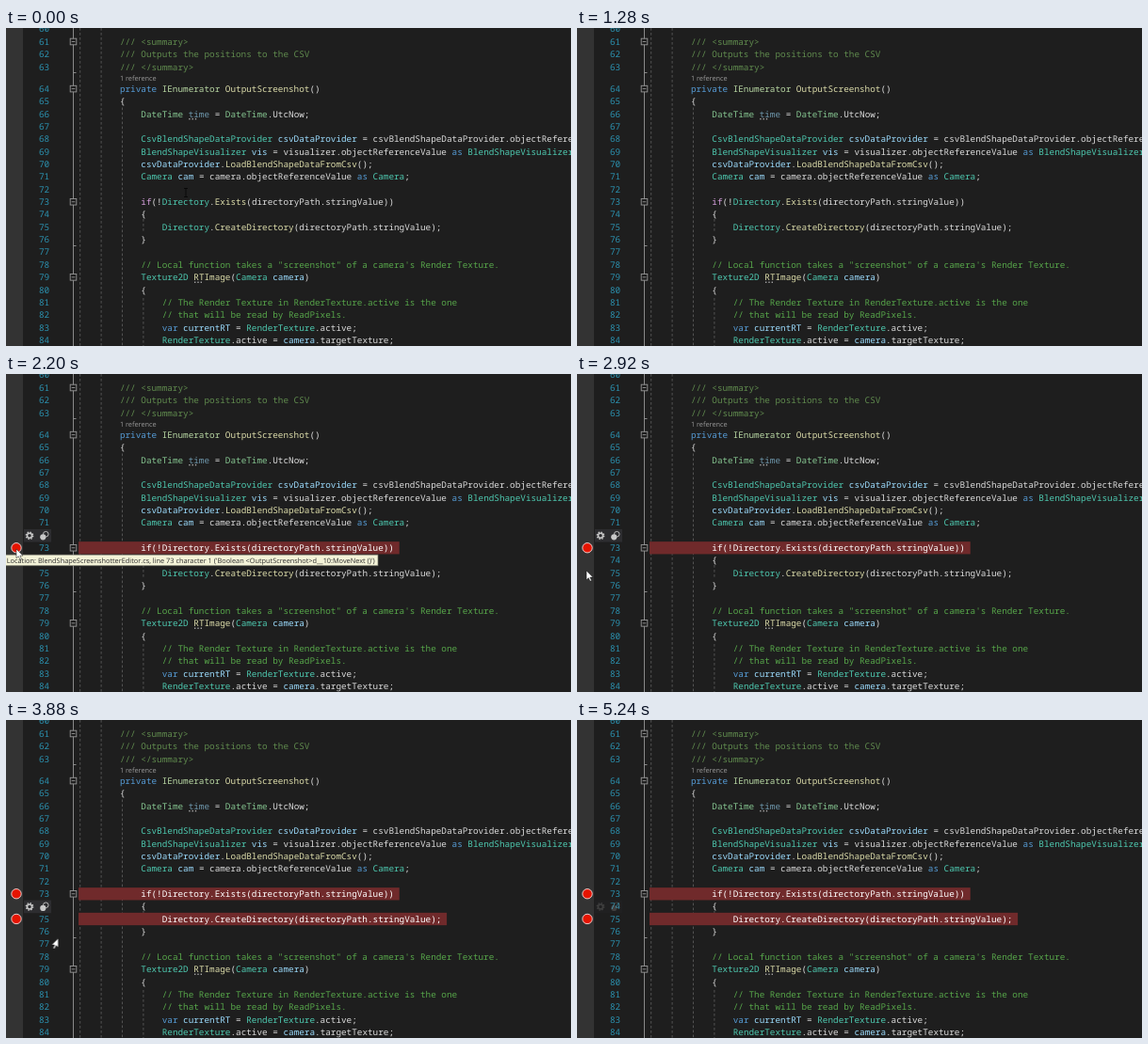
Recreate the animation shown at these times as an HTML page. Size 600 px wide and 338 px high, loop 5280 ms.

```html
<!DOCTYPE html>
<html lang="en">
<head>
<meta charset="utf-8">
<title>Setting breakpoints</title>
<style>
html, body { margin: 0; width: 100%; height: 100%; overflow: hidden; background: #1e1e1e; }
svg { display: block; width: 100%; height: 100%; }
text { white-space: pre; text-rendering: geometricPrecision; }
#numbers, #code, .hit { font: 9.333px "Noto Sans Mono", monospace; }
#numbers { fill: #2b91af; }
.ui { font: 7.35px "Open Sans", sans-serif; }

/* token colours */
.p { fill: #dcdcdc; } .k { fill: #569cd6; } .f { fill: #d8a0df; }
.t { fill: #4ec9b0; } .s { fill: #86c691; } .i { fill: #b8d7a3; }
.m { fill: #dcdcaa; } .v { fill: #9cdcfe; } .u { fill: #6f98ad; }
.c { fill: #57a64a; } .d { fill: #608b4e; }
.hit text { fill: #fff; }

.anim { animation: 5280ms step-end infinite; }
#hit73 { animation-name: hit73; }
#hit75 { animation-name: hit75; }
#bar73 { animation-name: bar73; }
#bar75 { animation-name: bar75; animation-timing-function: linear; }
#tip73 { animation-name: tip73; }
#tip75 { animation-name: tip75; }
#beam { animation-name: beam; }
#arrow { animation-name: arrowShow, arrowMove; }
#mirror { animation-name: mirrorShow, mirrorMove; }
#arrow, #mirror { animation-timing-function: step-end, ease-in-out; }

@keyframes hit73 { 0% { opacity: 0; } 36.364%, 100% { opacity: 1; } }
@keyframes hit75 { 0% { opacity: 0; } 65.152%, 100% { opacity: 1; } }
@keyframes bar73 { 0% { opacity: 0; } 38.636% { opacity: 1; } 65.152%, 100% { opacity: 0; } }
@keyframes bar75 { 0%, 65.9% { opacity: 0; } 66.667%, 96.212% { opacity: 1; } 100% { opacity: 0; } }
@keyframes tip73 { 0% { opacity: 0; } 40.152% { opacity: 1; } 46.97%, 100% { opacity: 0; } }
@keyframes tip75 { 0% { opacity: 0; } 68.182% { opacity: 1; } 71.212%, 100% { opacity: 0; } }
@keyframes beam { 0% { opacity: 1; } 10.606%, 100% { opacity: 0; } }
@keyframes arrowShow { 0% { opacity: 0; } 30.303% { opacity: 1; } 71.97%, 100% { opacity: 0; } }
@keyframes arrowMove {
  0%, 30.303% { transform: translate(32px, 182px); }
  31.818%, 45.455% { transform: translate(11px, 186px); }
  51.515%, 70.076% { transform: translate(10px, 209px); }
  71.97%, 100% { transform: translate(40px, 226px); }
}
@keyframes mirrorShow { 0% { opacity: 0; } 71.97% { opacity: 1; } 75.758%, 100% { opacity: 0; } }
@keyframes mirrorMove {
  0%, 71.97% { transform: translate(46px, 228px); }
  73.485%, 100% { transform: translate(55.5px, 232px); }
}
</style>
</head>
<body>
<svg viewBox="0 0 600 338">
  <defs>
    <path id="pointer" d="M0 0V9.8L2.3 7.7L3.9 11.3L5.5 10.6L3.9 7.1H7Z" fill="#fff" stroke="#111" stroke-width=".5"/>
    <g id="bar">
      <rect x="19" y="-6.8" width="29" height="13.6" fill="#2d2d30"/>
      <g fill="none" stroke="#c8c8c8">
        <circle cx="25" r="2.5" stroke-width="1.5"/>
        <circle cx="25" r="3.7" stroke-width="1.4" stroke-dasharray="1.45 1.456"/>
        <circle cx="42.3" cy="-1.6" r="2.8" stroke-width=".9"/>
      </g>
      <circle cx="39.3" cy="1.5" r="3.1" fill="#c8c8c8"/>
    </g>
  </defs>

  <rect width="600" height="338" fill="#1e1e1e"/>
  <rect width="18" height="338" fill="#333"/>
  <g id="guides" fill="none" stroke="#5a5a5a" stroke-width=".9" stroke-dasharray="2.7 2.3">
    <path d="M78.7 0V338M101.1 0V338M123.5 84.5V338M145.9 198V218M145.9 287V338"/>
  </g>
  <g id="outline" fill="#1e1e1e" stroke="#969696" stroke-width=".9">
    <path d="M71.5 0V338M71.5 47.5H74.5M71.5 231.5H74.5"/>
  </g>
  <g id="numbers"></g>
  <g id="code"></g>
  <text class="ui" x="120.9" y="56" fill="#999">1 reference</text>
  <g id="dots" fill="#a8a8a8"></g>

  <g id="hit73" class="hit anim"></g>
  <g id="hit75" class="hit anim"></g>
  <g id="bar73" class="anim"><use href="#bar" y="171.8"/></g>
  <g id="bar75" class="anim"><use href="#bar" y="198.4"/></g>
  <g id="tip73" class="tip anim"></g>
  <g id="tip75" class="tip anim"></g>

  <path id="beam" class="anim" d="M189 170.5H193M191 170.5V179.5M189 179.5H193" fill="none" stroke="#050505" stroke-width=".8"/>
  <g id="arrow" class="anim"><use href="#pointer"/></g>
  <g id="mirror" class="anim"><use href="#pointer" transform="scale(-1 1)"/></g>
</svg>
<script>
const pitch = 5.6, left = 120.9, rowHeight = 13.35;
const $ = id => document.getElementById(id);
const midY = n => n < 64 ? 14.5 + (n - 61) * rowHeight : 64.6 + (n - 64) * rowHeight;
const indentX = depth => left + depth * 4 * pitch;

function add(parent, tag, attrs, content = '') {
  const el = document.createElementNS('http://www.w3.org/2000/svg', tag);
  for (const key in attrs) el.setAttribute(key, attrs[key]);
  el.textContent = content;
  return parent.appendChild(el);
}

// Each row: line number, indent depth, tokens split by "¦" led by a colour class.
const rows = [
  [61, 0, 'd/// <summary>'],
  [62, 0, 'd/// Outputs the positions to the CSV'],
  [63, 0, 'd/// </summary>'],
  [64, 0, 'kprivate ¦iIEnumerator ¦mOutputScreenshot¦p()'],
  [65, 0, 'p{'],
  [66, 1, 'sDateTime ¦utime¦p = ¦sDateTime¦p.UtcNow;'],
  [68, 1, 'tCsvBlendShapeDataProvider ¦vcsvDataProvider¦p = csvBlendShapeDataProvider.objectReferenceValue'],
  [69, 1, 'tBlendShapeVisualizer ¦vvis¦p = visualizer.objectReferenceValue ¦kas ¦tBlendShapeVisualizer¦p;'],
  [70, 1, 'vcsvDataProvider¦p.¦mLoadBlendShapeDataFromCsv¦p();'],
  [71, 1, 'tCamera ¦vcam¦p = camera.objectReferenceValue ¦kas ¦tCamera¦p;'],
  [73, 1, 'fif¦p(!¦tDirectory¦p.¦mExists¦p(directoryPath.stringValue))'],
  [74, 1, 'p{'],
  [75, 2, 'tDirectory¦p.¦mCreateDirectory¦p(directoryPath.stringValue);'],
  [76, 1, 'p}'],
  [78, 1, 'c// Local function takes a "screenshot" of a camera\'s Render Texture.'],
  [79, 1, 'tTexture2D ¦mRTImage¦p(¦tCamera ¦vcamera¦p)'],
  [80, 1, 'p{'],
  [81, 2, 'c// The Render Texture in RenderTexture.active is the one'],
  [82, 2, 'c// that will be read by ReadPixels.'],
  [83, 2, 'kvar ¦vcurrentRT¦p = ¦tRenderTexture¦p.active;'],
  [84, 2, 'tRenderTexture¦p.active = ¦vcamera¦p.targetTexture;']
];

for (let n = 60; n <= 84; n++)
  add($('numbers'), 'text', { x: 34.9, y: midY(n) + 3.3 }, n);

for (const [n, depth, source] of rows) {
  const line = add($('code'), 'text', { x: indentX(depth), y: midY(n) + 3.3 });
  for (const token of source.split('¦'))
    add(line, 'tspan', { class: token[0] }, token.slice(1));
}

for (const n of [61, 64, 73, 79]) {
  const y = midY(n);
  add($('outline'), 'rect', { x: 68.2, y: y - 3.3, width: 6.6, height: 6.6 });
  add($('outline'), 'path', { d: `M69.7 ${y}H73.3` });
}

for (const [x, n] of [[194.2, 66], [200, 79]])
  for (let i = 0; i < 3; i++)
    add($('dots'), 'rect', { x: x + i * 3.3, y: midY(n) + 4.7, width: 1.4, height: 1.4 });

function breakpoint(n) {
  const [, depth, source] = rows.find(row => row[0] === n);
  const plain = source.split('¦').map(token => token.slice(1)).join('');
  const y = midY(n), x = indentX(depth), group = $('hit' + n);
  add(group, 'rect', { x: 77, y: y - 6.6, width: x + (plain.length + 1) * pitch - 77, height: 13.3, fill: '#702a2b' });
  add(group, 'text', { x, y: y + 3.3 }, plain);
  add(group, 'circle', { cx: 11, cy: y, r: 5.2, fill: '#e51400', stroke: '#f3dcdc', 'stroke-width': .9 });

  const tip = $('tip' + n);
  add(tip, 'rect', { x: -1, y: y + 7.4, width: 396, height: 11.6, fill: '#f4f3d8', stroke: '#77776c', 'stroke-width': .7 });
  add(tip, 'text', { class: 'ui', x: .8, y: y + 15.9, fill: '#2c2c2c' },
    `Location: BlendShapeScreenshotterEditor.cs, line ${n} character 1 ('Boolean <OutputScreenshot>d__10:MoveNext ()')`);
}
breakpoint(73);
breakpoint(75);
</script>
</body>
</html>
```
